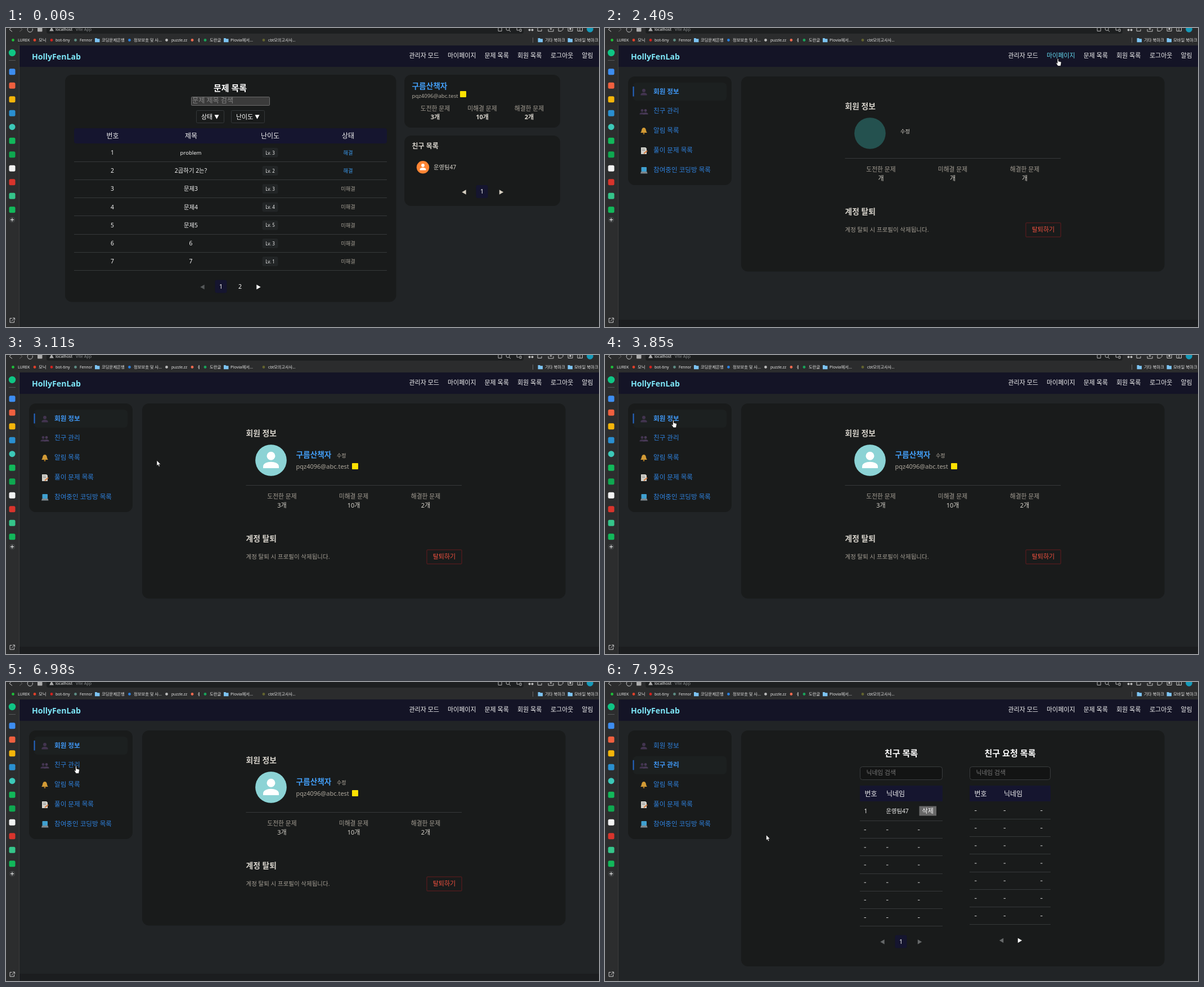
An HTML page for the animation above (7.99 s loop, 1054 by 531 pixels).

```html
<!DOCTYPE html>
<html lang="ko">
<head>
<meta charset="utf-8">
<style>
  html, body { margin: 0; width: 100%; height: 100%; overflow: hidden; background: #212426; }
  svg { display: block; width: 1054px; height: 531px; font-family: "Noto Sans", "Noto Sans CJK KR", sans-serif; }
</style>
</head>
<body>
<svg id="stage" viewBox="0 0 1054 531"></svg>
<script>
const LOOP = 7990, OPEN_INFO = 2400, LOADED = 2540, OPEN_FRIENDS = 7050;
const NAVY = '#15152f', CARD = '#191b1b', LINE = '#36393a', SAND = '#a39d93', PALE = '#d8d4cc', BLUE = '#429cf3', YELLOW = '#fde102';
const MID = 'text-anchor="middle" ', MEDIUM = 'font-weight="500"', BOLD = 'font-weight="700"';
const USER = '구름산책자', MAIL = 'pqz4096@abc.test', FRIEND = '운영팀47';

const text = (x, y, s, size, fill = '#f2f2f2', extra = '') =>
  `<text x="${x}" y="${y}" font-size="${size}" fill="${fill}" ${extra}>${s}</text>`;
const rect = (x, y, w, h, fill, r = 0, extra = '') =>
  `<rect x="${x}" y="${y}" width="${w}" height="${h}" rx="${r}" fill="${fill}" ${extra}/>`;
const frame = (x, y, w, h, fill, stroke, r = 2) => rect(x + .5, y + .5, w - 1, h - 1, fill, r, `stroke="${stroke}"`);
const dot = (x, y, r, fill) => `<circle cx="${x}" cy="${y}" r="${r}" fill="${fill}"/>`;
const path = (d, fill, extra = '') => `<path d="${d}" fill="${fill}" ${extra}/>`;
const stroke = (d, color, w = 1) => path(d, 'none', `stroke="${color}" stroke-width="${w}"`);
const rule = (x, y, w) => rect(x, y, w, 1, LINE);
const group = (id, body) => `<g id="${id}">${body}</g>`;
const list = (n, f) => Array.from({ length: n }, (_, i) => f(i)).join('');
const left = (x, y, fill) => path(`M${x - 3.7} ${y}l7.4-4.3v8.6z`, fill);
const right = (x, y, fill) => path(`M${x + 3.7} ${y}l-7.4-4.3v8.6z`, fill);
const down = (x, y) => path(`M${x} ${y + 3.8}l-4-7.6h8z`, '#fff');
const pageOne = (x, y) => rect(x - 10.5, y - 11.5, 21, 23, NAVY, 3) + text(x, y + 3.7, '1', 10.5, '#fff', MID);
const card = (x, y, w, h) => rect(x, y, w, h, CARD, 12);
const person = (x, y, k, fill) =>
  dot(x, y - 5 * k, 4.8 * k, fill) +
  path(`M${x - 9 * k} ${y + 9 * k}v${-2 * k}c0-${7 * k} ${18 * k}-${7 * k} ${18 * k} 0v${2 * k}z`, fill);

function browser() {
  const folder = x => path(`M${x} 18h3.5l1 1.2h4v6h-8.5z`, '#7cc3f2');
  const bookmarks = [
    [12.5, '#1fbf3a', 21, 'LUREK', 7], [51, '#e0402a', 58, '모닉', 7.4], [81, '#d3221f', 88, 'bot-tiny', 7],
    [123.5, '#5d8c84', 131, 'Fennor', 6.7], [0, '', 170, '코딩문제은행', 7.4], [219.5, '#2a80e0', 227, '정보보호 및 사...', 7.3],
    [285.5, '#bbb', 294, 'puzzle.zz', 6.7], [331, '#f06a50', 339, 'ㅔ', 7.4], [354, '#1aa35a', 362, '도란글', 7.4],
    [0, '', 399, 'Plovia에서...', 7.4], [458, '#62632f', 466, 'cbt모의고사사...', 7.1],
    [0, '', 958, '기타 북마크', 7.4], [0, '', 1010, '모바일 북마크', 7.4]];
  const icons = ['#3d8df0', '#f0603f', '#f5b50a', '#2a8fd0', '#3cc8b8', '#12b85a', '#0fa850', '#f2f2f2', '#d8342c', '#35c58a', '#12b85a'];
  return rect(0, 0, 1054, 31, '#2b2c2d') + rect(72, -6, 848, 16, '#1d1f20', 4) +
    stroke('M11-2L6 2.5l5 4', '#ccc') + stroke('M24-2l5 4.5-5 4', '#666') +
    stroke('M39 0a4.6 4.6 0 1 0 8 1', '#ccc') + rect(56, -2, 8.5, 8.5, '#aaa', 1) +
    path('M81-2l3.8 7.5h-7.6z', '#aaa') +
    text(88, 5, 'localhost', 7.1, '#eee', MEDIUM) + text(124, 5, 'Vite App', 7.2, '#85888a') +
    stroke('M875 0v5.5h6V0M894 4l3 2.5M908 0v4h4m1-2h3v4h-3z', '#b5b5b5') +
    `<circle cx="892" cy="1.5" r="3" fill="none" stroke="#b5b5b5"/>` +
    dot(930.5, 3.5, 2, '#bbb') + dot(935.5, 3.5, 2, '#bbb') +
    stroke('M945 0v5.5h7V2M964 2v4h9V2M968.5-1v4m-2-2l2 2 2-2M982 0v5.5h5l3-3V0M999 0v5.5h8V0M1016 0v5.5h8.5V0M1020-1v6', '#c4c4c4') +
    dot(1003, 1.8, 1.8, '#c4c4c4') + dot(1038, 2, 5.8, '#169ab9') +
    bookmarks.map(([dx, color, x, s, size]) => (dx ? dot(dx, 21.5, 2.4, color) : '') + text(x, 24, s, size, '#e4e4e4')).join('') +
    [158, 387, 945.5, 998.5].map(folder).join('') + rect(936, 17, 1, 9, '#666') +
    rect(0, 31, 24, 500, '#2c2d2e') + rect(23, 31, 1, 500, '#3b3c3d') +
    dot(11, 44, 6.2, '#0fc584') + rect(5, 57, 12, 1, '#55585a') +
    icons.map((c, i) => i === 4 ? dot(11, 175.7, 5.5, c) : rect(5.5, 72.3 + i * 24.5, 11, 11, c, 2.5)).join('') +
    dot(11, 340.5, 5.3, '#3c3e3f') + stroke('M8 340.5h6M11 337.5v6', '#eee') +
    stroke('M10.5 515.5H7v7.5h7.5v-3.5M12 515h3.5v3.5M15 515.5l-5 5', '#ccc');
}

const navItems = [[716.5, '관리자 모드', 52.5], [785, '마이페이지', 49], [850.5, '문제 목록'], [909, '회원 목록'], [968, '로그아웃'], [1023.5, '알림']];
const header = () => rect(24, 31, 1030, 38, '#141426') +
  text(46, 55.5, 'HollyFenLab', 14.1, '#7ee6f7', BOLD) +
  navItems.map(([x, s], i) => text(x, 53, s, 11, '#f2f2f2', `id="nav${i}"`)).join('');

const counts = [3, 10, 2];
const stats = (xs, y, gap, weight, values) => ['도전한 문제', '미해결 문제', '해결한 문제'].map((s, i) =>
  text(xs[i], y, s, 10.8, SAND, MID) + text(xs[i], y + gap, values[i] + '개', 11, PALE, MID + weight)).join('');
const infoStats = values => stats([490.5, 618, 746], 254.5, 16.5, MEDIUM, values);

function problems() {
  const titles = ['problem', '2곱하기 2는?', '문제3', '문제4', '문제5', '6', '7'], levels = [3, 2, 3, 4, 5, 3, 1];
  const columns = [[189.5, '번호'], [329, '제목'], [469.5, '난이도'], [608, '상태']];
  const filter = (x, w, s) => frame(x, 146, w, 23, CARD, '#34383a') + text(x + 9, 161.5, s, 11, '#fff', MEDIUM) + down(x + w - 13.5, 158);
  return card(105, 83, 588.5, 403.5) + text(398.5, 112, '문제 목록', 15, '#fff', MID + BOLD) +
    frame(329, 122, 140, 16, '#3b3b3b', '#6c6c6c', 1) + text(331, 133.3, '문제 제목 검색', 12.1, '#858585') +
    filter(338, 50, '상태') + filter(400, 60, '난이도') +
    rect(121, 178, 556, 27, NAVY, 4) + columns.map(([x, s]) => text(x, 195.5, s, 12, '#f2f2f2', MID)).join('') +
    list(7, i => {
      const y = 221.3 + i * 32.22, solved = i < 2;
      return text(189, y + 3.7, i + 1, 10.4, '#f2f2f2', MID) + text(328.5, y + 3.7, titles[i], i ? 10.4 : 9.5, '#f2f2f2', MID) +
        rect(455.5, y - 8.5, 28, 17, '#222526', 3) + text(469.5, y + 3.2, 'Lv. ' + levels[i], 8, '#f0f0f0', MID) +
        text(608, y + 3.4, solved ? '해결' : '미해결', 9.3, solved ? '#3b98ea' : SAND, MID) +
        rule(121, Math.round(y + 15.5), 556);
    }) +
    left(349, 460, '#56595a') + pageOne(382, 459) + text(416, 462.7, '2', 10.5, '#fff', MID) + right(449, 460, '#fff') +
    card(708, 83, 277, 94) + text(721.5, 107.5, USER, 13.7, BLUE, BOLD) + text(721.5, 123.5, MAIL, 9.6, '#ada79c') +
    rect(807, 112, 11, 11, YELLOW, 1) + stats([763, 846.5, 930], 147, 14.7, BOLD, counts) +
    card(708, 191, 277, 125) + text(721.5, 214.3, '친구 목록', 12, PALE, BOLD) +
    dot(741, 247.3, 11.2, '#ff8534') + person(741, 247, .6, '#fff') + text(760, 251, FRIEND, 10.3, PALE) +
    left(814, 291.5, '#d6cfc2') + pageOne(846, 290.5) + right(880.5, 291.5, '#d6cfc2');
}

const menu = ['회원 정보', '친구 관리', '알림 목록', '풀이 문제 목록', '참여중인 코딩방 목록'];
const sidebar = () => card(41, 86, 184, 193) +
  group('active', rect(50, 97, 166, 32, '#1c2020', 6) + rect(49.5, 104, 2, 17.5, '#2468c8')) +
  menu.map((s, i) => text(86, 116.5 + i * 34.75, s, 11.6, '#2f80db', `id="menu${i}"`)).join('') +
  person(69, 114, .62, '#42344f') + person(66, 149, .5, '#42344f') + person(72, 149, .5, '#493a57') +
  path('M63 186c3-2 1-9 6-9s3 7 6 9z', '#d29a35') + dot(69, 187.5, 1.4, '#a87522') +
  path('M64 212h8l2 2v10h-10z', '#d2d2cc') + stroke('M66 215h5M66 217.5h5', '#888') + stroke('M69 223l6-5', '#d77a3c', 2) +
  rect(64.5, 247, 9.5, 8, '#3f9fcf', 1) + path('M64 255h10.5l1 3.5h-12.5z', '#7d878d');

const info = () => card(242, 86, 752.5, 346.5) + rect(24, 518, 1030, 13, '#1b1d1f') +
  text(426.5, 143.8, '회원 정보', 13.8, PALE, BOLD) + rule(426.5, 231, 383.5) +
  text(426.5, 331, '계정 탈퇴', 13.8, PALE, BOLD) + text(426.5, 362, '계정 탈퇴 시 프로필이 삭제됩니다.', 10.5, SAND) +
  frame(747.5, 345.5, 63, 26, CARD, '#661b1e', 1) + text(779, 362.3, '탈퇴하기', 11, '#f0503f', MID) +
  dot(471, 187, 27.8, '#24514f') +
  group('empty', text(525, 187.3, '수정', 9.2, PALE) + infoStats(['', '', ''])) +
  group('filled', group('avatar', dot(471, 187, 27.8, '#8cd3d5') + person(471, 187, 1.55, '#fff')) +
    text(515.5, 182, USER, 13.7, BLUE, BOLD) + text(588, 181.8, '수정', 9, '#b8b0a4') +
    text(515.5, 202, MAIL, 11, '#ada79c') + rect(615, 192, 11, 11, YELLOW, 1) + infoStats(counts));

function friends() {
  const table = (x, w, title, nameX, top, marks) =>
    text(x + w / 2, 131.8, title, 15.1, '#fff', MID + BOLD) +
    frame(x, 150, w, 24, '#131414', '#3a3d3e', 4) + text(x + 11.5, 164.5, '닉네임 검색', 10.8, '#777') +
    rect(x, 184, w, 28, NAVY) + text(x + 8.5, 202.5, '번호', 12) + text(nameX, 202.5, '닉네임', 12) +
    list(7, i => rule(x, Math.round(top + i * 31.17), w) +
      (x < 600 && !i ? '' : marks.map(m => rect(m, top - 15 + i * 31.17, 3.5, 1, '#d5d5d5')).join('')));
  return card(242, 86, 752.5, 419) +
    table(453, 147, '친구 목록', 500, 246, [460.5, 500, 556]) + table(648, 144, '친구 요청 목록', 709, 243, [657, 708.5, 774]) +
    text(460.5, 233, '1', 10.4) + text(499.5, 233, FRIEND, 10.3) +
    rect(558.5, 220.5, 30.5, 17, '#686868') + text(573.7, 233, '삭제', 11, '#fff', MID) +
    left(493, 461.5, '#66696a') + pageOne(526, 461) + right(559.5, 461.5, '#66696a') +
    left(704.5, 459, '#66696a') + right(737.5, 459, '#fff');
}

const cursors = group('arrow', path('M0 0v9.8l2.2-2 1.5 3.5 1.7-.7-1.5-3.4h3z', '#fff', 'stroke="#111" stroke-width=".7"')) +
  group('hand', path('M-1 1q1-1.5 2 0v4l4 1q1 .3 1 1.5l-.8 4.5q-.3 1-1 1.5h-4.2l-3-4.5q-.8-1.5 .5-1.5l1.5 1.3z', '#fff', 'stroke="#111" stroke-width=".8"'));

document.getElementById('stage').innerHTML = browser() + header() + group('problems', problems()) +
  group('mypage', sidebar() + group('info', info()) + group('friends', friends())) + group('cursor', cursors);

// Pointer route: time, x, y
const route = [[0, 1024, 545], [70, 1020, 525], [450, 694, 240], [820, 742, 60], [910, 744, 57], [1050, 742, 48],
  [1250, 760, 44], [1410, 778, 41], [1670, 805, 54], [2470, 805, 54], [2800, 560, 130], [3160, 222, 196], [3230, 214, 198],
  [3500, 130, 165], [3850, 121.5, 115.5], [4980, 121.5, 115.5], [5440, 502.5, 333.5], [5560, 500, 330], [5720, 250, 240],
  [5780, 214, 230], [6100, 120, 175], [6390, 124.5, 149], [6980, 124.5, 149], [7250, 130, 155], [7450, 135, 178], [7920, 286.5, 271.5]];

function pointer(t) {
  const i = route.findIndex(k => k[0] > t);
  if (i < 1) return (i ? route.at(-1) : route[0]).slice(1);
  const [a, b] = [route[i - 1], route[i]], p = (t - a[0]) / (b[0] - a[0]);
  return [a[1] + (b[1] - a[1]) * p, a[2] + (b[2] - a[2]) * p];
}

const overNav = (t, i) => {
  const [x, y] = pointer(t), [nx, , w] = navItems[i];
  return x > nx && x < nx + w && y > 40 && y < 58;
};
// Averaging recent hover states gives a linear colour fade.
const navGlow = (t, i) => Array.from({ length: 15 }, (_, k) => overNav(t - k * 20, i)).filter(Boolean).length / 15;

const $ = id => document.getElementById(id);
const show = (id, on) => $(id).setAttribute('display', on ? 'inline' : 'none');

function draw(now) {
  const t = now % LOOP, [x, y] = pointer(t);
  const mypage = t >= OPEN_INFO, second = t >= OPEN_FRIENDS, loaded = t >= LOADED;
  show('problems', !mypage);
  show('mypage', mypage);
  show('info', !second);
  show('friends', second);
  show('empty', !loaded);
  show('filled', loaded);
  $('avatar').setAttribute('opacity', Math.min(1, Math.max(0, (t - LOADED) / 200)));
  $('active').setAttribute('transform', `translate(0 ${second ? 34.75 : 0})`);
  menu.forEach((_, i) => {
    const on = i === +second;
    $('menu' + i).setAttribute('font-weight', on ? 700 : 400);
    $('menu' + i).setAttribute('fill', on ? '#3f97f5' : '#2f80db');
  });
  [0, 1].forEach(i => {
    const g = navGlow(t, i);
    $('nav' + i).setAttribute('fill', `rgb(${242 - 142 * g},${242 - 24 * g},${242 - 2 * g})`);
  });
  const overMenu = mypage && x > 50 && x < 216 && y > 97 && y < 268;
  const hand = overMenu || overNav(t, 0) || overNav(t, 1);
  show('hand', hand);
  show('arrow', !hand);
  $('cursor').setAttribute('transform', `translate(${x} ${y})`);
  requestAnimationFrame(draw);
}
requestAnimationFrame(draw);
</script>
</body>
</html>
```
